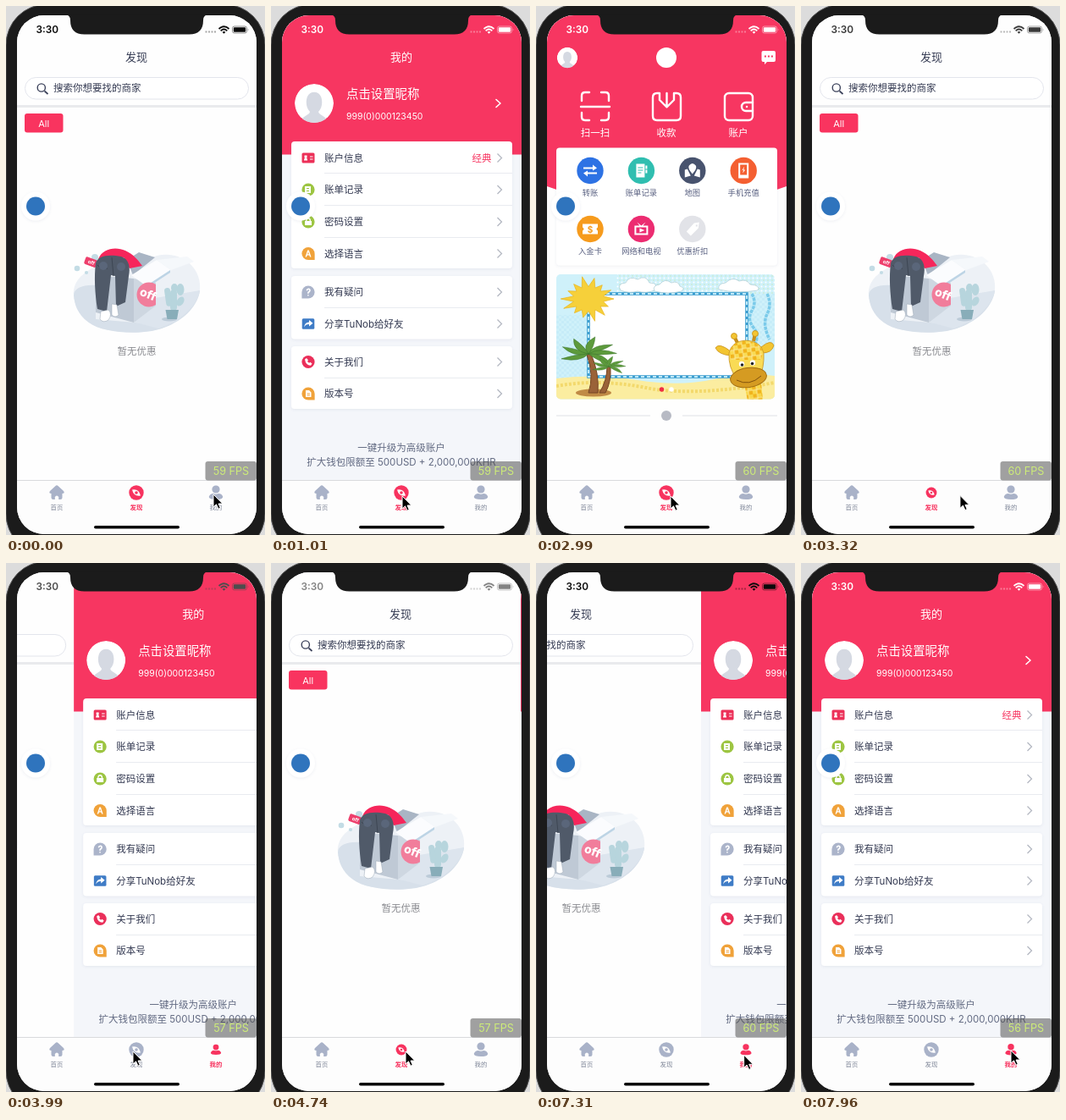
Recreate the animation shown at these times as an HTML page. Size 306 px wide and 625 px high, loop 7990 ms.

```html
<!DOCTYPE html>
<html lang="zh-CN">
<head>
<meta charset="utf-8">
<title>Wallet tabs</title>
<style>
html, body { margin: 0; width: 100%; height: 100%; overflow: hidden; background: #dcdcdc; }
svg { display: block; width: 306px; height: 625px; font: 11.5px Inter, "Noto Sans CJK SC", sans-serif; }
.mid { text-anchor: middle; }
.ink { fill: #343a52; }
.white { fill: #fff; }
.line { fill: none; stroke: #fff; stroke-width: 2.4; stroke-linecap: round; stroke-linejoin: round; }
.go { fill: none; stroke: #b4b8c2; stroke-width: 1.3; }
.title { font-size: 13px; font-weight: 500; }
.small { font-size: 9.3px; fill: #596080; }
.note { fill: #626a82; }
.tab text { font-size: 7.4px; fill: #7f8698; }
.tab { color: #a9b2c8; }
.tab.on { color: #f7335f; }
.tab.on text { fill: #f7335f; font-weight: 700; }
.tab path, .tab circle { fill: currentColor; }
.tab .hole { fill: #fdfdfd; }
</style>
</head>
<body>
<svg viewBox="0 0 306 625">
<defs>
  <clipPath id="screen"><rect x="13" y="11" width="283" height="613" rx="32"/></clipPath>
  <clipPath id="banner"><rect x="24" y="317" width="258" height="147.500" rx="5"/></clipPath>
  <clipPath id="badge"><path d="M150 320H177V372H150Z"/></clipPath>
  <clipPath id="face"><circle r="23"/></clipPath>
  <filter id="soft" x="-20%" y="-20%" width="140%" height="140%"><feDropShadow dx="0" dy="1" stdDeviation="1.500" flood-color="#5a6a90" flood-opacity=".11"/></filter>
  <pattern id="dots" width="5" height="5" patternUnits="userSpaceOnUse"><circle cx="1.500" cy="1.500" r="1" fill="#fff"/><circle cx="4" cy="4" r=".8" fill="#c9e8c0"/></pattern>
  <pattern id="checks" width="6" height="6" patternUnits="userSpaceOnUse"><path d="M0 0h3v3H0zM3 3h3v3H3z" fill="#b4e4f4"/></pattern>
  <pattern id="plaid" width="10" height="10" patternUnits="userSpaceOnUse" patternTransform="rotate(-8)"><path d="M0 0h5v5H0zM5 5h5v5H5z" fill="#f1b41c"/><path d="M0 5h10M5 0v10" stroke="#fdf0b0" stroke-width=".8"/></pattern>
  <g id="person" clip-path="url(#face)">
    <circle r="23" fill="#fff"/>
    <path d="M-16 25C-16 14-6 15-5 10C-10 5-10-3-8-8C-5-15 5-15 8-8C10-3 10 5 5 10C6 15 16 14 16 25Z" fill="#d5d9e2"/>
  </g>
</defs>
<rect y="-2" width="306" height="650" rx="48" fill="#1b1b1b" stroke="#555"/>
<g clip-path="url(#screen)">
  <rect x="13" y="11" width="283" height="614" fill="#fdfdfe"/>

  <g class="page">
    <rect x="13" y="11" width="283" height="550" fill="#fefefe"/>
    <path d="M13 11H296V213L154 262L13 213Z" fill="#f73661"/>
    <use href="#person" transform="translate(37 61) scale(.53)"/>
    <circle cx="154" cy="61" r="12" class="white"/>
    <path d="M268.500 53H281q2 0 2 2V64q0 2-2 2H273l-3 3V66h-1.500q-2 0-2-2V55q0-2 2-2Z" class="white"/>
    <path d="M269.900 59.500h2M273.900 59.500h2M277.900 59.500h2" stroke="#f73661" stroke-width="2"/>
    <g class="line">
      <path d="M54 112V106q0-4 4-4H63M77 102H82q4 0 4 4V112M86 126V131q0 4-4 4H77M63 135H58q-4 0-4-4V126M53 119H87"/>
      <path d="M146 103H143q-5 0-5 5V130q0 5 5 5H166q5 0 5-5V108q0-5-5-5H163M154.500 103V119M146 103V111L154.500 119.500L163 111V103"/>
      <rect x="223" y="103" width="33" height="32" rx="5"/><path d="M256 114H248a5 5 0 0 0 0 10H256M249 119h.1"/>
    </g>
    <g class="mid white" font-weight="500"><text x="70" y="154">扫一扫</text><text x="154" y="154">收款</text><text x="239" y="154">账户</text></g>
    <rect x="24" y="167.500" width="261" height="139" rx="4" fill="#fff" filter="url(#soft)"/>
    <g id="apps"></g>
    <g id="promo">
      <g clip-path="url(#banner)">
        <path d="M24 317H282V465H24Z" fill="#cff1fa"/>
        <path d="M95 317H282V340H95Z" fill="url(#dots)"/>
        <path d="M24 365H62V440H24ZM248 340H282V400H248Z" fill="url(#checks)" opacity=".35"/>
        <path d="M24 440Q70 434 120 442T210 441T282 437V465H24Z" fill="#fbeda0"/>
        <path d="M24 449Q75 440 130 451T282 445" fill="none" stroke="#f3d96c" stroke-width="4" stroke-dasharray="3 2"/>
        <path d="M255 340q6 10 0 20t2 20 0 22M273 340q6 12 0 24t3 30" fill="none" stroke="#7bcbea" stroke-width="3.500" stroke-dasharray="4 1"/>
        <rect x="62" y="340" width="187" height="98" fill="#fff" stroke="#3c9ed0" stroke-width="3.600"/>
        <rect x="62" y="340" width="187" height="98" fill="none" stroke="#bfe9f7" stroke-width="2" stroke-dasharray="4 3"/>
        <g fill="#fff" stroke="#a6cbd5" stroke-width=".7">
          <path d="M100 336q-5-8 6-9q4-9 14-4q10-6 14 4q12 0 6 9q-10 4-20 1q-10 3-20-1Z"/>
          <path d="M140 337q-3-7 6-8q6-8 14-2q8-3 10 4q7 2 2 6q-16 4-32 0Z"/>
          <path d="M216 335q-2-7 8-8q8-8 16-2q9-3 13 4q13 1 9 7q-24 4-46-1Z"/>
        </g>
        <polygon id="sun" fill="#f6d03a" stroke="#e8b31d" stroke-width=".7"/>
        <ellipse cx="68" cy="457" rx="21" ry="4.500" fill="#c08a45"/>
        <path d="M62 457Q69 436 60 412L65 411Q75 434 73 457ZM75 457Q84 442 84 426L88 427Q89 444 82 457Z" fill="#9a6238" stroke="#744524"/>
        <g id="leaves" fill="#5d9a3c" stroke="#3a742b" stroke-width=".6"></g>
        <path d="M243 430L250 466H268L264 425Z" fill="#f8d648"/><path d="M243 430L250 466H268L264 425Z" fill="url(#plaid)"/>
        <g fill="#f3c531" stroke="#c7901b" stroke-width=".8">
          <path d="M230 408Q216 397 212 404Q216 412 230 413ZM266 403Q278 393 281 401Q279 410 267 410Z"/>
          <path d="M238 398L234 390M257 396L259 386" stroke-width="4"/>
          <circle cx="234" cy="390" r="3.500"/><circle cx="259" cy="387" r="3.500"/>
          <path d="M228 410Q231 396 248 395Q266 396 269 410Q270 428 263 440H237Q227 427 228 410Z" fill="#f9db55"/>
        </g>
        <path d="M229 409Q232 396 248 396Q265 397 268 409L266 418H230Z" fill="url(#plaid)"/>
        <ellipse cx="251" cy="439" rx="21.500" ry="11.500" fill="#d59b22" stroke="#a36f12" transform="rotate(-8 251 439)"/>
        <path d="M237 442Q252 450 266 437" fill="none" stroke="#80520f"/>
        <g class="white"><circle cx="243" cy="423" r="3.200"/><circle cx="256" cy="421.500" r="3.200"/></g>
        <circle cx="243.500" cy="424" r="1.800" fill="#222"/><circle cx="255.500" cy="422.500" r="1.800" fill="#222"/>
        <circle cx="148.500" cy="453" r="2.700" fill="#ef2f45"/><circle cx="160" cy="453" r="2.700" class="white"/>
      </g>
      <path d="M24 484H135M173 484H285" stroke="#dfe1e6"/>
      <circle cx="154" cy="484" r="6" fill="#b7bac4"/>
    </g>
    <g id="veil">
      <path d="M13 11H296V561H13Z" fill="#f4f6fb" opacity=".8"/>
      <path d="M260 383.500H276V398.500H260ZM262 416H277.500V431H262Z" fill="#fafafa" stroke="#c5c6ca" stroke-width="1.700"/>
    </g>
  </g>

  <g class="page">
    <rect x="13" y="11" width="283" height="550" fill="#fefefe"/>
    <rect x="13" y="117" width="283" height="3" fill="#e9eaed"/>
    <text class="mid ink title" x="154" y="65">发现</text>
    <rect x="22.500" y="84.500" width="264" height="25.500" rx="12.700" fill="#fff" stroke="#e3e5ec"/>
    <path d="M45.500 100.500L49.500 104" stroke="#3b415a" stroke-width="1.700"/>
    <circle cx="41.800" cy="96.500" r="4.600" fill="none" stroke="#3b415a" stroke-width="1.400"/>
    <text class="ink" x="56" y="101">搜索你想要找的商家</text>
    <rect x="22" y="127" width="45.500" height="22.500" rx="3" fill="#f9345f"/>
    <text class="mid white" x="44.700" y="142.500" font-size="11">All</text>

    <path d="M80 342C78 322 98 309 118 304C145 300 155 303 178 295C208 288 232 310 229 336C226 358 205 374 184 381C160 389 115 387 98 374C84 364 81 352 80 342Z" fill="#edf1f6"/>
    <path d="M80 342C80 333 92 329 106 330V370L176 376L229 336C226 358 205 374 184 381C160 389 115 387 98 374C84 364 81 352 80 342Z" fill="#d7e0ea"/>
    <path d="M176 345L229 336C227 353 207 373 180 381L150 373Z" fill="#dde5ee"/>
    <path d="M143 300L157 291L176 297L150 318Z" fill="#a9b5c4"/>
    <path d="M106 318L151 322V374L106 362Z" fill="#bfc9d5"/>
    <path d="M151 322L177 327V354L151 374Z" fill="#ced7e1"/>
    <path d="M148 318L178 300L195 312L166 331Z" fill="#fbfcfe"/>
    <path d="M168 329L194 312L194 315L168 332Z" fill="#bdd4e5"/>
    <path d="M178 300L214 296L222 302L195 312Z" fill="#f5f8fb"/>
    <g clip-path="url(#badge)"><circle cx="169" cy="341" r="14.500" fill="#f17d9b"/></g>
    <text class="mid white" transform="translate(166 345) rotate(22)" font-size="14" font-weight="800">off</text>
    <path d="M109 299C114 286 130 284 141 289C150 293 156 300 161 307L146 310L139 297Z" fill="#f6265b"/>
    <g fill="#c3dce5"><circle cx="84" cy="310" r="3.300"/><circle cx="95" cy="315" r="2.100"/><circle cx="105" cy="297" r="4"/></g>
    <rect x="93" y="298" width="15" height="9" rx="2" fill="#ee3f6c" transform="rotate(20 100 302)"/>
    <text class="mid white" transform="translate(100 305) rotate(20)" font-size="6" font-weight="700">off</text>
    <path d="M106 304C108 295 121 293 136 296C146 299 147 310 145 319L141 350L130 355L129 319L124 318L119 361L108 358C105 340 104 319 106 304Z" fill="#505a69"/>
    <path d="M125 297L127 319M108 306Q113 312 120 310" fill="none" stroke="#3d4653"/>
    <circle cx="115" cy="307" r="5" fill="#5a667a"/><circle cx="136" cy="308" r="5" fill="#5a667a"/>
    <g fill="#fff" stroke="#9aa6b5" stroke-width=".5"><path d="M112 361L121 359Q126 364 121 371Q115 375 111 370Z"/><path d="M125 352L131 353L133 365Q129 369 125 365Z"/></g>
    <ellipse cx="193" cy="370" rx="9" ry="2.500" fill="#bccbd8"/>
    <g fill="#b7d5dd"><rect x="194" y="335" width="8" height="25" rx="4"/><rect x="188" y="333" width="7" height="22" rx="3.500" transform="rotate(-8 191 343)"/><ellipse cx="206" cy="335" rx="4.500" ry="7"/><ellipse cx="199" cy="333" rx="4" ry="5"/><ellipse cx="206" cy="349" rx="4" ry="6" transform="rotate(30 206 349)"/></g>
    <path d="M188.500 359H204L202 370H190.500Z" fill="#88adb9"/>
    <text class="mid" x="154.500" y="412" fill="#8b8c91">暂无优惠</text>
  </g>

  <g class="page">
    <rect x="13" y="11" width="283" height="550" fill="#f4f6fa"/>
    <rect x="13" y="11" width="283" height="164.500" fill="#f73661"/>
    <text class="mid white title" x="154" y="65">我的</text>
    <use href="#person" x="51" y="115"/>
    <text class="white" x="89" y="109" font-size="14.400">点击设置昵称</text>
    <text class="white" x="89" y="134" font-size="10.500">999(0)000123450</text>
    <path d="M266 110.500L271 115L266 119.500" class="line" style="stroke-width:1.600"/>
    <g fill="#fff" filter="url(#soft)"><rect x="24" y="160" width="261" height="150" rx="4"/><rect x="24" y="319" width="261" height="74.500" rx="4"/><rect x="24" y="402" width="261" height="74" rx="4"/></g>
    <path d="M63 197.500H285M63 235.500H285M63 273.500H285M63 356.500H285M63 439.500H285" stroke="#e9ebf0"/>
    <g id="rows"></g>
    <text x="237.500" y="183.500" fill="#f7335f">经典</text>
    <text class="mid note" x="154" y="525.500">一键升级为高级账户</text>
    <text class="mid note" x="154" y="542.500">扩大钱包限额至 500USD + 2,000,000KHR</text>
  </g>

  <rect x="13" y="560" width="283" height="65" fill="#fdfdfd"/>
  <path d="M13 560.500H296" stroke="#d9dadd"/>
  <g class="tab"><g><path d="M-1.500-8Q0-9.500 1.500-8L8-2Q10 1 6.500 1V5.500Q6.500 8 4 8H-4Q-6.500 8-6.500 5.500V1Q-10 1-8-2Z"/><path class="hole" d="M-2.200 8V5Q0 2 2.200 5V8Z"/></g><text class="mid" x="60" y="594.500">首页</text></g>
  <g class="tab"><g><circle r="8.700"/><path class="hole" d="M-5-3.500Q3-5 5 3.500Q-3 5-5-3.500Z"/><circle r="1.800"/></g><text class="mid" x="154" y="594.500">发现</text></g>
  <g class="tab"><g><circle cy="-4" r="4.600"/><path d="M-8.300 5Q-7 1-3 1Q0 2.500 3 1Q7 1 8.300 5Q8 8 0 8Q-8 8-8.300 5Z"/></g><text class="mid" x="248" y="594.500">我的</text></g>
  <rect x="104" y="613.900" width="101" height="3.700" rx="1.800" fill="#050505"/>

  <circle cx="35" cy="236.500" r="17" fill="#fff" filter="url(#soft)"/>
  <circle cx="35" cy="236.500" r="11" fill="#2f74bd"/>

  <g id="status">
    <text x="35.500" y="32" font-size="11.800" font-weight="600">3:30</text>
    <path d="M235.500 30.500H248" stroke="currentColor" stroke-width="1.800" stroke-dasharray="2 1.500" opacity=".35"/>
    <path d="M251.500 27Q257.500 21.500 263.500 27M253.700 29.300Q257.500 25.800 261.300 29.300" fill="none" stroke="currentColor" stroke-width="1.800"/>
    <path d="M255.600 30.800Q257.500 29.200 259.400 30.800L257.500 32.800Z"/>
    <rect x="267.500" y="24" width="17" height="8" rx="2.300" fill="none" stroke="currentColor" stroke-opacity=".45"/><rect x="268.800" y="25.300" width="14.400" height="5.400" rx="1.200"/><path d="M285.800 26.500q1.600 1.500 0 3z" opacity=".5"/>
  </g>
  <rect x="235.500" y="538" width="60.500" height="22.500" rx="3" fill="#555" opacity=".55"/>
  <text id="fps" class="mid" x="266" y="554" font-size="12.600" fill="#cdec78"></text>
</g>
<path d="M71 10.500Q76 11 76 17Q76 33.500 92.500 33.500H216.500Q233 33.500 233 17Q233 11 238 10.500Z" fill="#1b1b1b"/>
<path id="cursor" d="M0 0V15L3.500 11.800L6 17.200L8.300 16.200L6 11H10.800Z" fill="#000" stroke="#fff" stroke-width="1"/>
</svg>
<script>
const LOOP = 7990, PAGE_W = 283;
const $ = id => document.getElementById(id);
const all = sel => [...document.querySelectorAll(sel)];
const clamp = v => Math.min(1, Math.max(0, v));
const smooth = v => (v = clamp(v), v * v * (3 - 2 * v));
const mix = (a, b, k) => a + (b - a) * k;

// Home grid: label, colour, white glyph centred on the disc
const apps = [
  ['转账', '#2d72e4', 'M-8-4H3V-7L8-3L3 0V-2H-8ZM8 4H-3V7L-8 3L-3 0V2H8Z'],
  ['账单记录', '#30beb0', 'M-6-8H4V8H-6ZM5-6H7V-2H5ZM5-1H7V3H5ZM-4-4V-3H2V-4ZM-4-1V0H2V-1ZM-4 2V3H0V2Z'],
  ['地图', '#48536e', 'M0 4Q-6-3-4-6Q0-11 4-6Q6-3 0 4ZM-9-1L-6-2L-2 6L-9 8ZM9-1L6-2L2 6L9 8Z'],
  ['手机充值', '#f45f31', 'M-6-9H6V9H-6ZM-4-7V5H4V-7ZM-1 3L0-1L-2 0L1-5L0-1L2-1Z'],
  ['入金卡', '#f69b1d', 'M-9-6H9V-2Q6 0 9 2V6H-9V2Q-6 0-9-2Z'],
  ['网络和电视', '#ec2c71', 'M-8-4H-2L-5-8L0-4L5-8L2-4H8V7H-8ZM-6-2V5H6V-2ZM-2-1L4 1.500L-2 4Z'],
  ['优惠折扣', '#e2e3e8', 'M-7 3L2-7L8-8L7-1L-2 8ZM4-5V-3H6V-5Z']
];
$('apps').innerHTML = apps.map(([label, color, d], i) => {
  const x = 64 + i % 4 * 60.4, y = i < 4 ? 194.5 : 263.5;
  return `<g transform="translate(${x} ${y})"><circle r="15.7" fill="${color}"/>
    <path d="${d}" fill="#fff" fill-rule="evenodd"/>${i == 4 ? '<text class="mid" y="4" font-size="10" font-weight="700" fill="#f69b1d">$</text>' : ''}
    <text class="mid small" y="29.5">${label}</text></g>`;
}).join('');

const disc = '<circle r="7.6"/>', drop = '<path d="M0-7.6A7.6 7.6 0 0 1 7.6 0V7.6H0A7.6 7.6 0 0 1 0-7.6Z"/>';
const rows = [
  [179.5, '账户信息', '#ec3058', '<rect x="-7.5" y="-6" width="15" height="12" rx="1.5"/>', 'M-5 3Q-5 0-3 0Q-1 0-1 3ZM-4.500-3H-1.500V0H-4.500ZM2-2H5.500V-1H2ZM2 1H5.500V2H2Z'],
  [217, '账单记录', '#9dc542', disc, 'M-4-4H3V4H-4ZM-2-2V-1H1V-2ZM-2 1V2H1V1Z'],
  [255, '密码设置', '#9dc542', disc, 'M-4-1H-3Q-3-5 0-5Q3-5 3-1H4V4H-4ZM-1.800-1H1.800Q1.500-3.500 0-3.500Q-1.500-3.500-1.800-1Z'],
  [292.5, '选择语言', '#f0a23a', drop, 'M-3.500 4L-.8-4H.8L3.500 4H2L1.300 2H-1.300L-2 4ZM-.9 .7H.9L0-2Z'],
  [338, '我有疑问', '#abb4ca', '<g transform="scale(-1 1)">' + drop + '</g>', 'M-2.500-2Q-2-5 1-4.500Q4-3 2 0L.6 1V2H-.8V0L1-1.500Q1.500-3 0-3L-1.200-1.500ZM-.8 3H.6V4.500H-.8Z'],
  [375.5, '分享TuNob给好友', '#3f7cc6', '<rect x="-7.3" y="-6.3" width="14.600" height="12.600" rx="1.5"/>', 'M-5 4Q-4-2 1-2V-4.500L5.500-.7L1 3V.6Q-3 .5-5 4Z'],
  [420.5, '关于我们', '#ea2f5a', disc, 'M-4-3L-2-4.500L0-2L-1-.7Q0 1 1.200 1.300L2.300 .2L4.500 2L3 4.300Q-3 4-4-3Z'],
  [458, '版本号', '#f0a23a', drop, 'M-3-4H1L3.500-1.500V4H-3ZM-1.500-.5V.4H2V-.5ZM-1.500 1.500V2.400H2V1.500Z']
];
$('rows').innerHTML = rows.map(([y, label, color, shape, d]) => `<g transform="translate(44 ${y})" fill="${color}">${shape}
  <path d="${d}" fill="#fff" fill-rule="evenodd"/></g><text class="ink" x="63" y="${y + 4}">${label}</text>
  <path class="go" d="M267.500 ${y - 5}L272.500 ${y}L267.500 ${y + 5}"/>`).join('');

$('sun').setAttribute('points', Array.from({length: 28}, (_, i) => {
  const a = i * Math.PI / 14, r = i % 2 ? 18 : 30 + 4 * Math.sin(i * 2.3);
  return `${62 + r * Math.cos(a)},${346 + r * .8 * Math.sin(a)}`;
}).join(' '));
$('leaves').innerHTML = [[62, 411, 1], [86, 426, .6]].map(([x, y, s]) =>
  [-165, -130, -85, -40, -10, 30, 155].map(a =>
    `<path d="M0 0Q16-11 33 5Q15 6 0 0Z" transform="translate(${x} ${y}) scale(${s} ${s * .62}) rotate(${a})"/>`).join('')).join('');

// Tap time, page, slide start, slide length, span in which the icon grows back
const taps = [
  [-2000, 1, -2000, 300, -1300, -1000],
  [50, 2, 75, 300],
  [1010, 1, 1030, 300],
  [1890, 0, 1912, 300, 2290, 2570],
  [2990, 1, 3010, 300],
  [3760, 2, 3786, 300],
  [4490, 1, 4490, 260, 5200, 5530],
  [7170, 2, 7190, 300, 7850, 8180]
];
const route = [
  [0, 245, 577], [350, 245, 577], [810, 155, 579], [1200, 155, 579], [1430, 105, 585], [1650, 55, 576],
  [2150, 55, 576], [2570, 159, 579], [3180, 159, 579], [3550, 248, 577], [3775, 248, 577], [3990, 150, 577],
  [4240, 159, 577], [5800, 159, 577], [6450, 83, 584], [6520, 84, 583], [6610, 84, 584], [6800, 165, 587],
  [6990, 244, 585], [7200, 244, 585], [7450, 248, 576], [LOOP, 248, 576]
];
const rates = [[0, 59], [400, 58], [780, 59], [1400, 57], [2350, 60], [3450, 59], [3900, 57], [5850, 60], [7500, 56]];

const pages = all('.page'), tabs = all('.tab');

function iconScale(t, [tap, , , , from = Infinity, to = Infinity]) {
  const back = from < Infinity ? smooth((t - from) / (to - from)) : 0;
  return 1 - .26 * smooth((t - tap) / 200) * (1 - back);
}

function draw(t) {
  const n = taps.findLastIndex(tap => t >= tap[0]);
  const now = taps[n], prev = taps[n - 1] || now;
  const [, page, start, length] = now;

  const pos = mix(prev[1], page, smooth((t - start) / length));
  pages.forEach((p, i) => {
    const x = (i - pos) * PAGE_W;
    p.setAttribute('transform', `translate(${x} 0)`);
    p.style.display = Math.abs(x) < PAGE_W ? '' : 'none';
  });
  const loading = page == 0 ? 1 - smooth((t - 2130) / 320) : 0;
  $('veil').style.opacity = loading;
  $('promo').style.opacity = 1 - loading;

  tabs.forEach((tab, i) => {
    const on = i == page;
    tab.classList.toggle('on', on);
    tab.firstChild.setAttribute('transform', `translate(${60 + 94 * i} 575) scale(${on ? iconScale(t, now) : 1})`);
  });

  const shade = p => p == 1 ? 10 : 255;
  const c = mix(shade(prev[1]), shade(page), clamp((t - start - 150) / 200));
  $('status').style.color = $('status').style.fill = `rgb(${c},${c},${c})`;
  $('fps').textContent = rates.findLast(r => t >= r[0])[1] + ' FPS';

  const k = Math.min(route.findLastIndex(p => t >= p[0]), route.length - 2);
  const [t0, x0, y0] = route[k], [t1, x1, y1] = route[k + 1];
  const e = smooth((t - t0) / (t1 - t0));
  $('cursor').setAttribute('transform', `translate(${mix(x0, x1, e)} ${mix(y0, y1, e)})`);
}

const origin = performance.now();
function tick() {
  draw((performance.now() - origin) % LOOP);
  requestAnimationFrame(tick);
}
tick();
</script>
</body>
</html>
```
